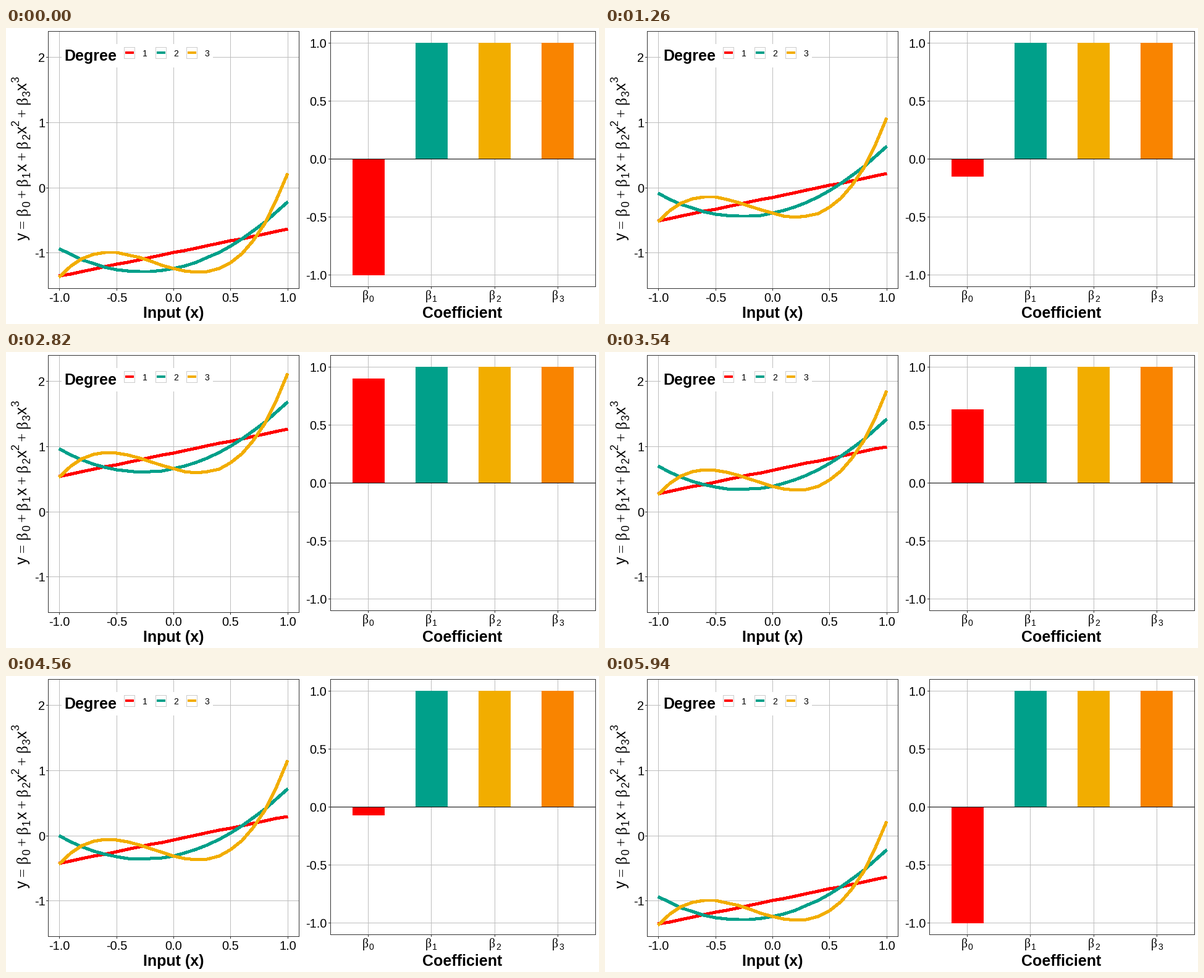
Recreate the animation shown at these times as a matplotlib script. Size 960 px wide and 480 px high, loop 6 s.

```python
import numpy as np
import matplotlib.pyplot as plt
from matplotlib.animation import FuncAnimation
from matplotlib.patches import Rectangle

W, H, DPI = 960, 480, 96
PT = 72 / DPI  # points per pixel
FRAMES, INTERVAL = 100, 60

RED, GREEN, YELLOW, ORANGE = "#FF0000", "#00A08A", "#F2AD00", "#F98400"
GRID, EDGE, KEY_EDGE = "#BEBEBE", "#333333", "#CCCCCC"
SANS, SERIF = "Liberation Sans", "Liberation Serif"

fig = plt.figure(figsize=(W / DPI, H / DPI), dpi=DPI, facecolor="white")
ax = fig.add_axes([0, 0, 1, 1])
ax.set_xlim(0, W)
ax.set_ylim(H, 0)
ax.axis("off")


def box(x0, y0, x1, y1, color, z=1):
    """Fill the pixels from (x0, y0) up to, but not including, (x1, y1)."""
    patch = Rectangle((x0, y0), x1 - x0, y1 - y0, facecolor=color,
                      edgecolor="none", antialiased=False, zorder=z)
    return ax.add_patch(patch)


def frame_box(x0, y0, x1, y1, color, z):
    box(x0, y0, x1 + 1, y0 + 1, color, z)
    box(x0, y1, x1 + 1, y1 + 1, color, z)
    box(x0, y0, x0 + 1, y1 + 1, color, z)
    box(x1, y0, x1 + 1, y1 + 1, color, z)


def label(x, y, s, size, ha="left", bold=False, font=SANS, rotation=0):
    ax.text(x, y, s, fontsize=size * PT, family=font, ha=ha, va="baseline",
            weight="bold" if bold else "normal", color="black",
            rotation=rotation, zorder=8)


def panel(x0, y0, x1, y1, xs, ys):
    """Grid, border and outward tick marks."""
    for x in xs:
        box(x, y0, x + 1, y1, GRID)
        box(x, y1 + 1, x + 1, y1 + 4, EDGE)
    for y in ys:
        box(x0, y, x1, y + 1, GRID)
        box(x0 - 3, y, x0, y + 1, EDGE)
    frame_box(x0, y0, x1, y1, EDGE, 6)


# Orthonormal polynomials on an even grid
x = np.linspace(-1, 1, 21)
raw = [x, x**2 - np.mean(x**2), x**3 - x * np.sum(x**4) / np.sum(x**2)]
basis = [p / np.linalg.norm(p) for p in raw]
curves = np.cumsum(basis, axis=0)

low, high = curves.min() - 1, curves.max() + 1
pad = 0.05 * (high - low)
scale = 417 / (high - low + 2 * pad)


def left_x(v):
    return 68 + (v + 1.1) * 406 / 2.2


def left_y(v):
    return 5.5 + (high + pad - v) * scale


def right_x(k):
    return 525 + (k + 0.6) * 429 / 4.2


def right_y(v):
    return 5.6 + (1.1 - v) * 414 / 2.2


# Left panel
x_ticks = np.linspace(-1, 1, 5)
xs = [round(left_x(v)) for v in x_ticks]
ys = [round(left_y(v)) for v in (2, 1, 0, -1)]
panel(68, 5, 474, 422, xs, ys)
for px, v in zip(xs, x_ticks):
    label(px + 0.5, 444, f"{v:.1f}", 20, "center")
for py, v in zip(ys, (2, 1, 0, -1)):
    label(63.5, py + 8, str(v), 20, "right")
label(271, 470, "Input (x)", 25, "center", bold=True)

px = np.round(left_x(x))
lines = [ax.plot(px, px, color=c, lw=4 * PT, antialiased=False, snap=False,
                 solid_capstyle="butt", solid_joinstyle="round", zorder=3)[0]
         for c in (RED, GREEN, YELLOW)]

# Legend
box(90, 26, 335, 64, "white", 4)
label(94, 53.5, "Degree", 25, bold=True)
for k, color in enumerate((RED, GREEN, YELLOW)):
    kx = round(191 + 50.5 * k)
    frame_box(kx, 31, kx + 17, 49, KEY_EDGE, 5)
    box(kx + 2, 38, kx + 16, 42, color, 5)
    label(220.8 + 50.1 * k, 46, str(k + 1), 14)

# Right panel
bar_ticks = np.linspace(1, -1, 5)
bar_xs = [round(right_x(k)) for k in range(4)]
bar_ys = [int(right_y(v)) for v in bar_ticks]
zero = bar_ys[2]
panel(525, 5, 954, 419, bar_xs, bar_ys)
for py, v in zip(bar_ys, bar_ticks):
    label(519.5, py + 8, f"{v:.1f}", 20, "right")
label(739, 470, "Coefficient", 25, "center", bold=True)

bars = []
for k, color in enumerate((RED, GREEN, YELLOW, ORANGE)):
    bx = 561 + 102 * k
    bars.append(box(bx, bar_ys[0], bx + 52, zero, color, 3))
    label(bar_xs[k] - 9, 440, "β", 20, font=SERIF)
    label(bar_xs[k] + 2, 444, str(k), 14)
box(525, zero, 955, zero + 1, "black", 5)


def formula(bx, y, size):
    """Write the model upwards, piece by piece, from (bx, y)."""
    pieces = "y = b_0 + b_1 x + b_2 x ^2 + b_3 x ^3"
    pieces = pieces.replace("b_", "b _").split()
    for p in pieces:
        if p in "=+":
            gap = size * (5 if p == "=" else 4) / 18
            label(bx, y - gap, p, size, font=SERIF, rotation=90)
            y -= 0.549 * size + 2 * gap
        elif p == "b":
            label(bx, y, "β", size, font=SERIF, rotation=90)
            y -= 0.549 * size
        elif p[0] in "_^":
            shift = 5 if p[0] == "_" else -13
            label(bx + shift, y, p[1], 0.7 * size, rotation=90)
            y -= 0.556 * 0.7 * size
        else:
            label(bx, y, p, size, rotation=90)
            y -= 0.5 * size


for text in ax.texts:
    text.set_rotation_mode("anchor")
formula(34, 344, 25)
for text in ax.texts:
    text.set_rotation_mode("anchor")

# The intercept climbs in steps of 0.1, each lasting whole frames, then rewinds
levels = np.linspace(-1, 1, 21)
keys = np.floor(2.45 * np.arange(21) + 0.5 + 1e-9)


def update(i):
    b0 = np.interp(min(i, FRAMES - 1 - i), keys, levels)
    for line, curve in zip(lines, curves):
        line.set_ydata(np.round(left_y(b0 + curve)))
    y = int(right_y(b0))
    top, bottom = min(y, zero), max(y + 1, zero)
    bars[0].set_y(top)
    bars[0].set_height(bottom - top)
    return [*lines, bars[0]]


anim = FuncAnimation(fig, update, frames=FRAMES, interval=INTERVAL,
                     repeat=True, repeat_delay=0, blit=False)
plt.show()
```
